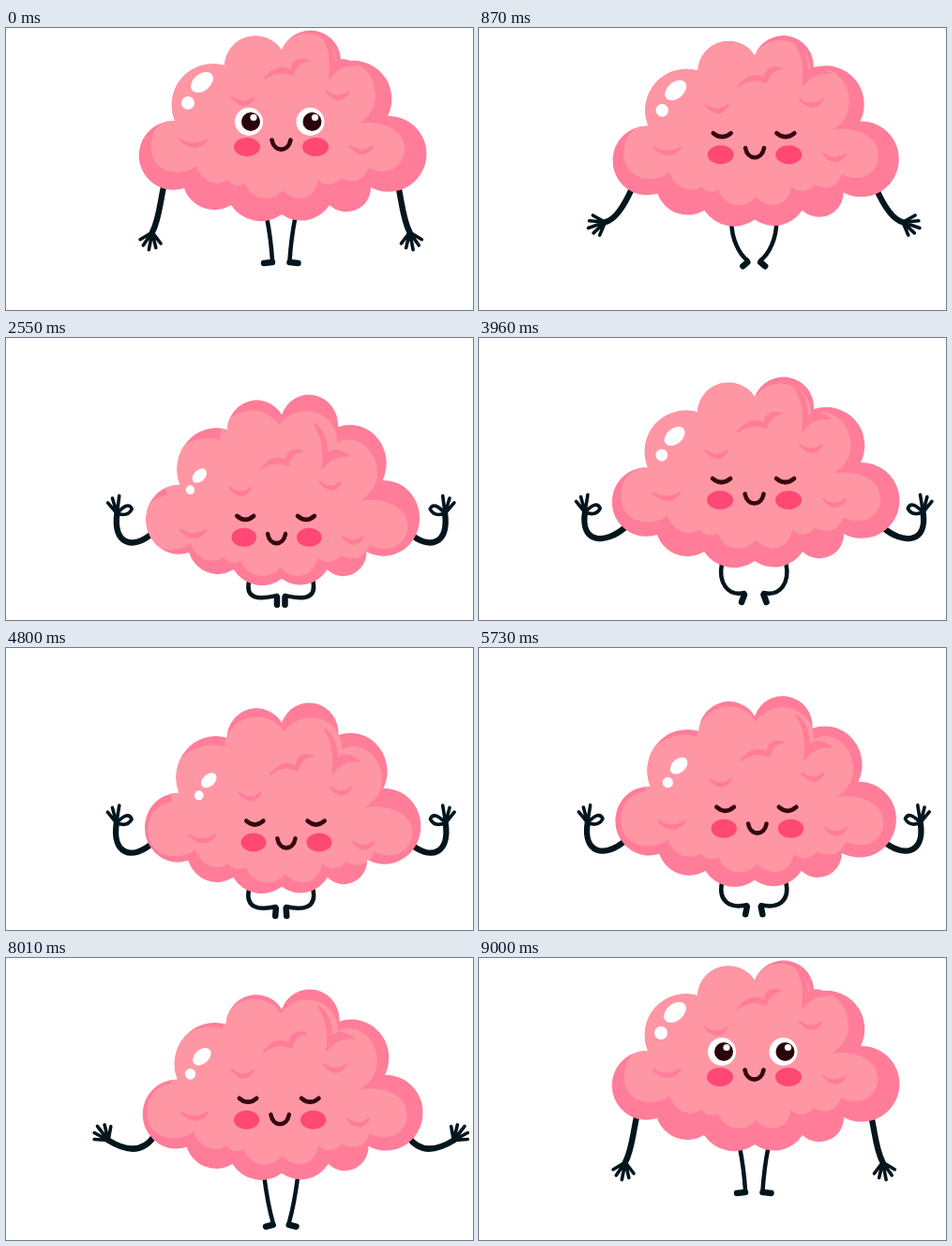
Recreate the animation shown at these times as an HTML page. Size 498 px wide and 301 px high, loop 9030 ms.

```html
<!DOCTYPE html>
<html lang="en">
<head>
<meta charset="utf-8">
<title>Meditating brain</title>
<style>
html, body { margin: 0; width: 100%; height: 100%; overflow: hidden; background: #fff; }
svg { display: block; width: 498px; height: 301px; }
.limb { fill: none; stroke: #03151d; stroke-linecap: round; stroke-linejoin: round; }
.fold { fill: #ff7d99; stroke: #ff7d99; stroke-width: 2; stroke-linejoin: round; }
.line { fill: none; stroke: #35070f; stroke-width: 4.6; stroke-linecap: round; }
</style>
</head>
<body>
<svg viewBox="0 0 498 301">
  <defs>
    <clipPath id="edge"><use href="#outline"/></clipPath>
    <path id="dimple" d="M-12 -4Q0 5 12 -4Q2 12 -12 -4Z"/>
  </defs>
  <g id="left">
    <path class="limb leg" stroke-width="4.5"/>
    <path class="limb foot" stroke-width="6.5"/>
    <path class="limb arm" stroke-width="6.3"/>
    <path class="limb hand" stroke-width="3.6"/>
  </g>
  <use href="#left" transform="translate(586.5 0) scale(-1 1)"/>

  <g id="body">
    <path id="outline" fill="#ff7d99" d="M233 40A33 33 0 0 1 294 24A32.5 32.5 0 0 1 357 37A41 41 0 0 1 407 94A40.4 40.4 0 1 1 389 170A26 26 0 0 1 345 189A36 36 0 0 1 294 199A38 38 0 0 1 240 189A34 34 0 0 1 190 171A36.9 36.9 0 1 1 180 99A44 44 0 0 1 233 40Z"/>
    <g clip-path="url(#edge)">
      <path id="inner" fill="#ff96a4" d="M180 99A44 44 0 0 1 233 40A33 33 0 0 1 294 24A32 32 0 0 1 353 43C372 32 394 50 394 75C394 90 385 100 376 105C395 101 425 108 425 132C425 152 405 162 386 152C382 166 370 170 357 163C350 172 338 172 333 165C329 188 308 190 295 176C284 190 262 188 255 169C248 172 242 172 237 165C228 172 210 170 203 150C190 162 158 160 155 134C153 112 166 100 180 99Z"/>
    </g>
    <g id="detail">
      <g class="fold">
        <path d="M276 54Q290 37 304 46Q306 30 322 35Q310 36 306 50Q290 43 276 54Z"/>
        <path d="M336 6Q349 26 345 53Q356 38 374 40Q358 29 350 39Q350 16 336 6Z"/>
        <use href="#dimple" x="253" y="78"/>
        <use href="#dimple" x="354" y="72"/>
        <use href="#dimple" x="379" y="130"/>
        <use href="#dimple" transform="translate(200 123) scale(1.2 1)"/>
      </g>
      <g fill="#ff4874">
        <ellipse cx="257" cy="127" rx="14" ry="10"/>
        <ellipse cx="330" cy="127" rx="14" ry="10"/>
      </g>
      <g id="open">
        <g id="eye">
          <circle cx="259" cy="100" r="15" fill="#fff"/>
          <circle cx="261" cy="100" r="10" fill="#2a060c"/>
          <circle cx="264" cy="95.500" r="3.600" fill="#fff"/>
        </g>
        <use href="#eye" x="65.500"/>
      </g>
      <path id="shut" class="line" d="M249 104Q258.500 112 268 104M317 104Q326.500 112 336 104"/>
      <path id="mouth" class="line" d="M283.500 119.500C286 133 301 133 303.500 119.500"/>
      <g id="shine" fill="#fff">
        <ellipse cx="209" cy="58" rx="13.500" ry="9" transform="rotate(-40 209 58)"/>
        <circle cx="194" cy="80" r="7"/>
      </g>
    </g>
  </g>
</svg>
<script>
const LOOP = 9030, STEP = 30;
const $ = s => document.querySelector(s);
const put = (s, name, value) => $(s).setAttribute(name, value);
const lerp = (a, b, k) => a + (b - a) * k;
const mix = (a, b, k) => a.map((v, i) => lerp(v, b[i], k));
const pts = (...v) => v.map(x => x.toFixed(2)).join(' ');

// Smooth 0 to 1 between two times
function ramp(t, from, to) {
  const k = Math.min(1, Math.max(0, (t - from) / (to - from)));
  return k * k * (3 - 2 * k);
}
const pulse = (t, from, top, to) => ramp(t, from, top) - ramp(t, top, to);

// Shoulder, pull from shoulder, pull on wrist, wrist, hand angle
const HANG = [168, 170, -4, 18, 7, -13, 156, 218, 95];
const SPREAD = [157, 159, -14, 20, 16, 11, 106, 193, 235];
const CALM = [156, 150, -22, 19, -5, 33, 119, 187, 273];

// All movement follows from these few values
function poseAt(t) {
  const sit = ramp(t, 420, 2820) - ramp(t, 7200, 8850);
  const lift = pulse(t, 2800, 3970, 5130) + pulse(t, 5130, 6270, 7200);
  return {
    lift,
    drop: 60 * sit - 21 * lift,
    shift: 29 * sit - 22 * lift,
    wide: 1 - 0.05 * (sit - lift),
    sway: -6 * sit * Math.cos((t - 2850) / 4400 * 2 * Math.PI),
    spread: ramp(t, 300, 1560) - ramp(t, 7850, 8900),
    calm: ramp(t, 1560, 2700) - ramp(t, 7200, 7850),
    cross: ramp(t, 400, 1400) - ramp(t, 7250, 8250),
    sink: ramp(t, 1500, 2760) - ramp(t, 7850, 8500),
    open: 1 - ramp(t, 620, 800) + ramp(t, 8050, 8230)
  };
}

function drawBody({ drop, shift, wide, sway, open }) {
  const widen = (k, x, y) => `translate(${pts(295 + x, y)}) scale(${k.toFixed(4)} 1) translate(-295 0)`;
  const shut = open < 0.15;
  put('#body', 'transform', widen(wide, 0, drop));
  put('#inner', 'transform', widen(1 + shift * 0.0035, sway / 2, shift * 0.5 - 3));
  put('#detail', 'transform', `translate(${pts(sway, shift)})`);
  put('#mouth', 'transform', `translate(0 ${pts(shift * 0.13)})`);
  put('#shine', 'transform', `translate(203 68) scale(${pts(1 - shift * 0.011)}) translate(-203 -68)`);
  put('#open', 'transform', `translate(0 ${pts(105 - 5 * open)}) scale(1 ${pts(open)}) translate(0 -100)`);
  put('#open', 'visibility', shut ? 'hidden' : 'visible');
  put('#shut', 'visibility', shut ? 'visible' : 'hidden');
}

// Fingers fan out; the first two close into a ring when calm
function finger(i, calm) {
  const angle = (54 - 24 * i) * Math.PI / 180, reach = 19 - 2 * Math.abs(i - 2);
  const tip = [reach * Math.cos(angle), reach * Math.sin(angle)];
  const bend = tip.map(v => v / 2);
  const ring = i < 2 ? calm : 0;
  return 'M0 0Q' + pts(...mix(bend, [5 + (i ? 9 : -9), 12], ring), ...mix(tip, [5, 16], ring));
}

function drawArm({ drop, lift, spread, calm }) {
  const [sx, sy, ax, ay, bx, by, x, wy, angle] = mix(mix(HANG, SPREAD, spread), CALM, calm);
  const top = sy + drop + 13 * lift, wx = x - 6 * lift, y = wy - lift;
  put('.arm', 'd', `M${pts(sx, top)}C${pts(sx + ax, top + ay, wx + bx, y + by, wx, y)}`);
  put('.hand', 'd', Array.from({ length: 5 }, (_, i) => finger(i, calm)).join(''));
  put('.hand', 'transform', `translate(${pts(wx, y)}) rotate(${pts(angle)})`);
}

function drawLeg({ drop, lift, cross, sink }) {
  const hip = lerp(278, 259, cross), top = 202 + drop;
  const x = lerp(284, 289, cross) - 6 * lift;
  const y = 248 + sink * (29 + 14 * (1 - cross)) - 5 * lift;
  const [ax, ay, bx, by] = mix([3, 15, -1, -15], [-4, 20, -18, 4], cross);
  const toe = mix([-9, 1], [-3 * lift, 8], cross);
  put('.leg', 'd', `M${pts(hip, top)}C${pts(hip + ax, top + ay, x + bx, y + by, x, y)}`);
  put('.foot', 'd', `M${pts(x, y + 2)}l${pts(...toe)}`);
}

function tick() {
  const t = Math.floor((performance.now() % LOOP) / STEP) * STEP;
  const pose = poseAt(t);
  drawBody(pose);
  drawArm(pose);
  drawLeg(pose);
  requestAnimationFrame(tick);
}
tick();
</script>
</body>
</html>
```
